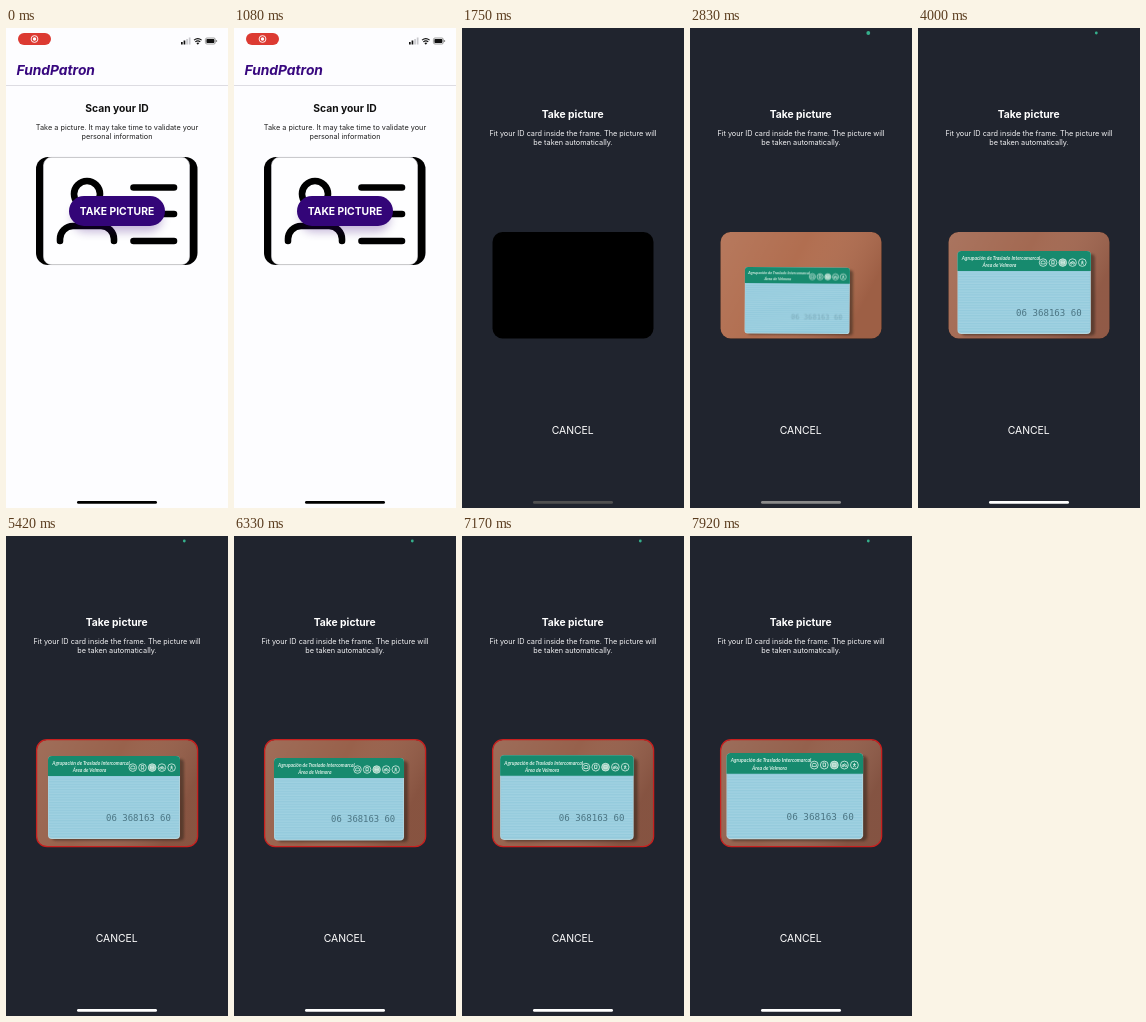
Animation, 222 px wide and 480 px high, one loop 8000 ms. Source, as an HTML page:

```html
<!DOCTYPE html>
<html lang="en">
<head>
<meta charset="utf-8">
<title>ID scan</title>
<style>
  html, body { margin: 0; width: 100%; height: 100%; overflow: hidden; background: #fdfdff; }
  svg { display: block; width: 100vw; height: 100vh; font-family: Inter, Roboto, sans-serif; }
  text { text-anchor: middle; }
  .title { font-size: 10.3px; font-weight: 700; }
  .body { font-size: 7.3px; }
  .card text { font-family: Lato, sans-serif; font-weight: 700; font-style: italic; fill: #d9efe6; }
  .card .number { font: 9px "DejaVu Sans Mono", monospace; fill: #4a7482; }
</style>
</head>
<body>
<svg viewBox="0 0 222 480" preserveAspectRatio="none">
  <defs>
    <clipPath id="lens"><rect x="30.5" y="204" width="161" height="106.5" rx="10"/></clipPath>
    <linearGradient id="shade" x2="1" y2=".35">
      <stop offset="0" stop-color="#fff" stop-opacity=".08"/>
      <stop offset=".5" stop-color="#fff" stop-opacity="0"/>
      <stop offset="1" stop-color="#200" stop-opacity=".14"/>
    </linearGradient>
    <pattern id="lines" width="6" height="2.6" patternUnits="userSpaceOnUse">
      <path d="M0 1h6" stroke="#c3e6f0" stroke-width=".8" opacity=".45"/>
    </pattern>
    <filter id="soft" x="-30%" y="-60%" width="160%" height="240%"><feGaussianBlur stdDeviation="5"/></filter>
    <filter id="cast"><feGaussianBlur stdDeviation="1.2"/></filter>
  </defs>

  <g id="scan">
    <rect width="222" height="480" fill="#fdfdff"/>
    <path d="M0 57.5h222" stroke="#dddce2"/>
    <rect x="12" y="5" width="33" height="12" rx="6" fill="#dc3a32"/>
    <circle cx="28.5" cy="11" r="3.4" fill="none" stroke="#fff" stroke-width=".9"/>
    <circle cx="28.5" cy="11" r="1.7" fill="#fff"/>
    <g fill="#111">
      <path d="M175 14h1.7v2.5h-1.7zM177.6 12.6h1.7v3.9h-1.7z"/>
      <path d="M180.2 11h1.7v5.5h-1.7zM182.8 9.6h1.7v6.9h-1.7z" fill="#c8c8cc"/>
      <path d="M191.8 16.8l-1.5-1.7q1.5-1.2 3 0z"/>
      <path d="M188 12.2q3.8-3.2 7.6 0M189.3 13.9q2.5-2 5 0" fill="none" stroke="#111" stroke-width="1.1"/>
      <rect x="199.4" y="10" width="10" height="6" rx="1.6" fill="none" stroke="#888" stroke-width=".8"/>
      <rect x="200.4" y="11" width="8" height="4" rx=".7"/>
      <path d="M210.6 12v2" stroke="#888"/>
    </g>
    <text x="10.5" y="47" style="text-anchor:start;font-size:13.8px;font-weight:700;font-style:italic" fill="#38087f">FundPatron</text>
    <text class="title" x="111" y="84" fill="#111">Scan your ID</text>
    <g class="body" fill="#222">
      <text x="111" y="102">Take a picture. It may take time to validate your</text>
      <text x="111" y="111">personal information</text>
    </g>
    <rect x="30" y="129" width="161.5" height="108" rx="12"/>
    <rect x="37.5" y="129.3" width="146" height="107.4" rx="8" fill="#fefeff" stroke="#d5d5da" stroke-width=".6"/>
    <g fill="none" stroke="#000" stroke-width="6.6" stroke-linecap="round">
      <circle cx="81" cy="166" r="13"/>
      <path d="M54 213v-2a13 13 0 0 1 13-13h28a13 13 0 0 1 13 13v2M127.5 159.5h40.5M127.5 186h40.5M127.5 213h40.5"/>
    </g>
    <rect x="66" y="176" width="90" height="28" rx="14" fill="#330578" opacity=".28" filter="url(#soft)"/>
    <rect x="63" y="168" width="96" height="30" rx="15" fill="#330578"/>
    <text class="title" x="111" y="187" fill="#fff">TAKE PICTURE</text>
    <rect x="71" y="473" width="80" height="2.8" rx="1.4"/>
  </g>

  <g id="capture">
    <rect width="222" height="480" fill="#20242e"/>
    <text class="title" x="110.7" y="90" fill="#fff">Take picture</text>
    <g class="body" fill="#f1f1f3">
      <text x="111" y="108">Fit your ID card inside the frame. The picture will</text>
      <text x="111" y="117">be taken automatically.</text>
    </g>
    <rect x="30.5" y="204" width="161" height="106.5" rx="10"/>
    <g id="feed" clip-path="url(#lens)">
      <rect id="desk" x="30" y="203" width="162" height="108"/>
      <rect x="30" y="203" width="162" height="108" fill="url(#shade)"/>
      <g id="card" class="card">
        <rect x="4" y="3" width="132" height="81.5" rx="4" fill="#34251f" opacity=".55" filter="url(#cast)"/>
        <rect width="132" height="83" rx="4" fill="#b5d6de"/>
        <rect x=".6" y="1" width="130.6" height="80.8" rx="3.5" fill="#94cadc"/>
        <rect x="1" y="21" width="130" height="59" fill="url(#lines)"/>
        <path d="M0 20V4a4 4 0 0 1 4-4h124a4 4 0 0 1 4 4v16z" fill="#178a6e"/>
        <g id="print">
          <text x="43" y="9" font-size="4.9">Agrupación de Traslado Intercomarcal</text>
          <text x="41.5" y="16" font-size="4.9">Área de Velmora</text>
          <g id="badges" fill="none" stroke="#d9efe6" stroke-width=".8"></g>
          <text id="number" class="number" x="90.5" y="64.7">06 368163 60</text>
        </g>
      </g>
    </g>
    <rect id="alert" x="30.6" y="203.7" width="161" height="107" rx="10.5" fill="none" stroke="#c8201f" stroke-width="1.3"/>
    <circle id="dot" cx="178.3" cy="5" r="1.5" fill="#35b08c"/>
    <text x="110.7" y="405.7" font-size="10.4" fill="#fff">CANCEL</text>
    <rect id="home" x="71" y="473" width="80" height="2.8" rx="1.4"/>
  </g>
</svg>
<script>
const LOOP = 8000, CAPTURE = 1750, CAMERA_ON = 2400, ALERT_ON = 4600;
const $ = id => document.getElementById(id);

// time, card x, y, scale x, scale y, tilt, desk r, g, b, ink
const poses = [
  [2400, 58, 243, .77, .78, .6, 180, 112, 80, .3],
  [2830, 55, 239, .795, .8, .4, 177, 110, 80, .4],
  [3450, 42, 225, .97, .97, .1, 168, 106, 81, .9],
  [4000, 39.5, 223, 1.01, 1, 0, 163, 105, 82, 1],
  [5420, 42, 220, 1, 1, 0, 152, 98, 76, 1],
  [6330, 40, 222, .985, .995, 0, 152, 97, 75, 1],
  [7920, 36.5, 217, 1.035, 1.04, 0, 148, 97, 77, 1]
];
const homeTone = [[1750, 80], [2830, 138], [3500, 250], [4000, 255]];

function sample(table, t) {
  const next = table.findIndex(row => row[0] > t);
  if (next === 0) return table[0].slice(1);
  if (next < 0) return table[table.length - 1].slice(1);
  const a = table[next - 1], b = table[next];
  const k = (t - a[0]) / (b[0] - a[0]);
  return a.slice(1).map((v, i) => v + (b[i + 1] - v) * k);
}

const glyphs = [
  'M-2-.3l.7-1.3h2.6l.7 1.3v1.6h-4z',
  'M-1.2-2h2.4v3.2h-2.4zM-1.2 2l.6-.8M1.2 2l-.6-.8',
  'M-1.7-1.6h3.4v3h-3.4zM-1.7 0h3.4',
  'M-2.3 .6a1 1 0 1 0 2 0a1 1 0 1 0-2 0M.3 .6a1 1 0 1 0 2 0a1 1 0 1 0-2 0M-1.3 .6l1-1.7h1.2',
  'M0-2v2.1l-1.2 2M0 .1l1.2 2M-1.3-.5h2.6'
];
$('badges').innerHTML = glyphs.map((d, i) =>
  `<g transform="translate(${84.8 + i * 9.7} 11.6)"><circle r="3.8" fill="${i === 2 ? '#8cc5b4' : 'none'}"/><path d="${d}"/></g>`
).join('');

const show = (id, on) => $(id).setAttribute('visibility', on ? 'inherit' : 'hidden');

function draw(t) {
  $('scan').style.display = t < CAPTURE ? '' : 'none';
  $('capture').style.display = t < CAPTURE ? 'none' : '';
  if (t < CAPTURE) return;
  show('feed', t >= CAMERA_ON);
  show('dot', t >= CAMERA_ON);
  show('alert', t >= ALERT_ON);

  const [x, y, sx, sy, tilt, r, g, b, ink] = sample(poses, t);
  $('card').setAttribute('transform', `translate(${x} ${y}) rotate(${tilt}) scale(${sx} ${sy})`);
  $('desk').setAttribute('fill', `rgb(${r},${g},${b})`);
  $('number').setAttribute('opacity', ink);
  $('print').style.filter = ink < 1 ? `blur(${(1 - ink) * .6}px)` : 'none';
  $('dot').setAttribute('r', t < 3400 ? 1.9 : 1.4);
  const [tone] = sample(homeTone, t);
  $('home').setAttribute('fill', `rgb(${tone},${tone},${tone})`);
}

const start = performance.now();
function tick() {
  draw((performance.now() - start) % LOOP);
  requestAnimationFrame(tick);
}
tick();
</script>
</body>
</html>
```
